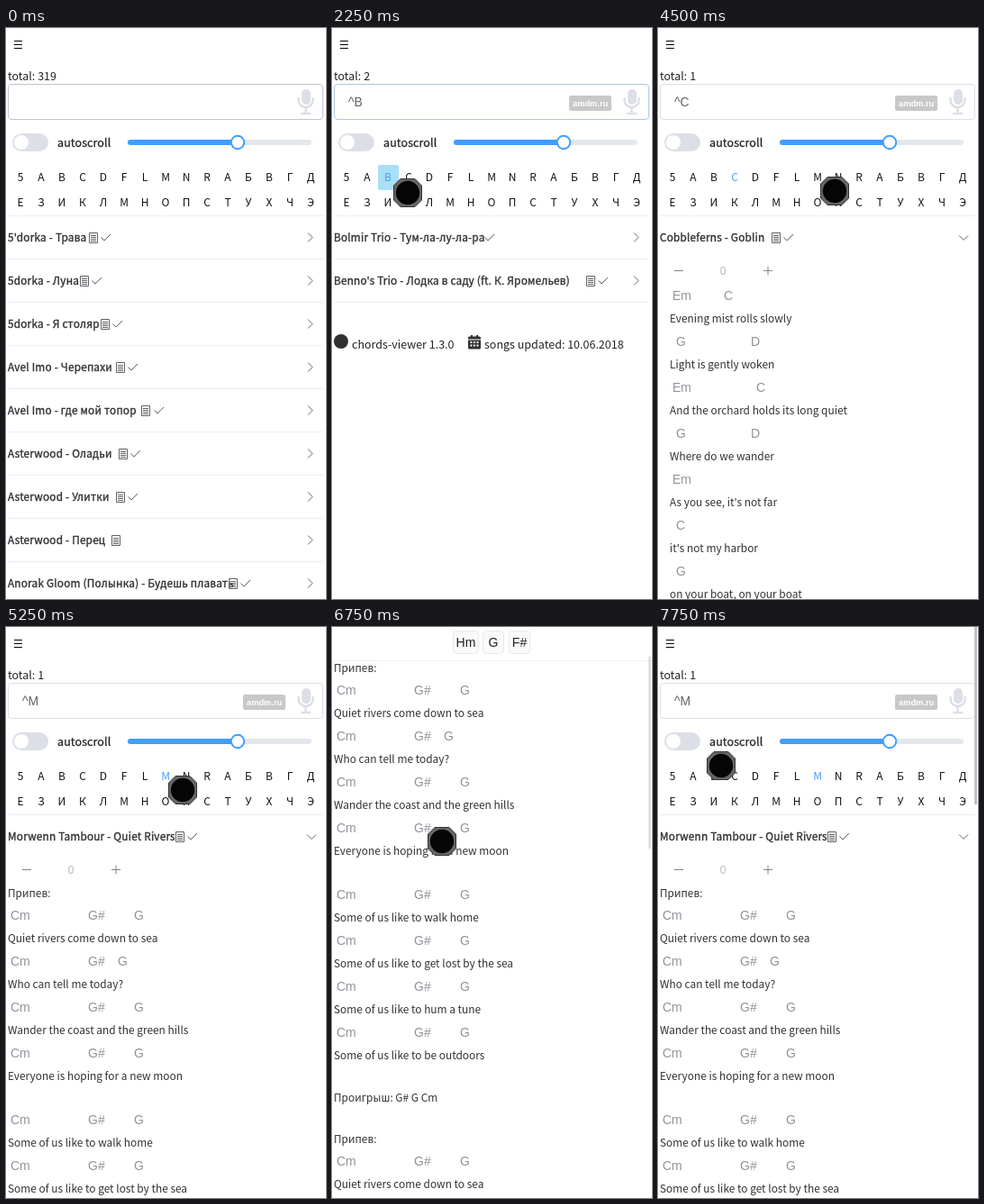
These frames come from a looping animation (355 by 634 pixels, 8000 ms). An HTML page:

```html
<!DOCTYPE html>
<html lang="ru">
<head>
<meta charset="utf-8">
<title>Chords viewer</title>
<style>
html, body { margin: 0; width: 100%; height: 100%; overflow: hidden; background: #fff; }
svg { display: block; width: 355px; height: 634px; fill: none; }
text { font: 12.5px "Noto Sans CJK SC", "Noto Sans CJK JP", "Noto Sans", sans-serif; fill: #222; white-space: pre; }
.title { font-size: 11.8px; letter-spacing: .2px; fill: #303133; stroke: #303133; stroke-width: .35px; }
.label { stroke: #222; stroke-width: .25px; letter-spacing: .1px; }
.lyric { font-size: 11.9px; fill: #303133; }
.key { font-size: 12px; text-anchor: middle; fill: #111; }
.key.on { fill: #409eff; }
.arial, .chord, .pill, .tag, .shift { font: 14px "Liberation Sans", Arial, sans-serif; fill: #606266; }
.chord { fill: #909399; }
.pill { fill: #222; text-anchor: middle; }
.tag { font-size: 9.3px; font-weight: 700; fill: #fff; }
.shift { font-size: 12px; fill: #b4b8c0; text-anchor: middle; }
</style>
</head>
<body>
<svg id="stage" viewBox="0 0 355 634"></svg>
<script>
const KEYS = ['5ABCDFLMNRAБВГД', 'ЕЗИКЛМНОПСТУХЧЭ'];

// [title, x of the text icon, x of the check mark]
const ALL = [
  ["5'dorka - Трава", 92, 105], ['5dorka - Луна', 82, 95], ['5dorka - Я столяр', 105, 118],
  ['Avel Imo - Черепахи', 122, 135], ['Avel Imo - где мой топор', 150, 164],
  ['Asterwood - Оладьи', 125, 138], ['Asterwood - Улитки', 122, 135], ['Asterwood - Перец', 117, 0],
  ['Anorak Gloom (Полынка) - Будешь плавать', 247, 260]
];
const BANDS = [
  ['Bolmir Trio - Тум-ла-лу-ла-ра', 0, 169],
  ["Benno's Trio - Лодка в саду (ft. К. Яромельев)", 282, 295]
];
const GOBLIN = ['Cobbleferns - Goblin', 126, 139];
const RIVERS = ['Morwenn Tambour - Quiet Rivers', 188, 201];

// [y of the chords, chords with their x, line below]
const GOBLIN_TEXT = [
  [297, 'Em16 C73', 'Evening mist rolls slowly'],
  [348, 'G20 D103', 'Light is gently woken'],
  [399, 'Em16 C109', 'And the orchard holds its long quiet'],
  [450, 'G20 D103', 'Where do we wander'],
  [501, 'Em16', "As you see, it's not far"],
  [552, 'C20', "it's not my harbor"],
  [603, 'G20', 'on your boat, on your boat']
];
const CM = 'Cm5 G#91 G142';
const FIRST = 'Quiet rivers come down to sea';
const RIVERS_TEXT = [
  [269.5, '', 'Припев:'],
  [320, CM, FIRST],
  [371, 'Cm5 G#91 G124', 'Who can tell me today?'],
  [422, CM, 'Wander the coast and the green hills'],
  [473, CM, 'Everyone is hoping for a new moon'],
  [547, CM, 'Some of us like to walk home'],
  [598, CM, 'Some of us like to get lost by the sea'],
  [649, CM, 'Some of us like to hum a tune'],
  [700, CM, 'Some of us like to be outdoors'],
  [746.5, '', 'Проигрыш: G# G Cm'],
  [792.5, '', 'Припев:'],
  [843, CM, FIRST]
];

// [start, x, y]
const POINTER = [
  [750, 119, 317], [1000, 84, 183], [1250, 75, 184], [1500, 84, 183], [1750, 85, 182], [2000, 84, 183],
  [3000, 107, 180], [3500, 107, 178], [4000, 136, 180], [4250, 184, 182], [4500, 196, 181],
  [6000, 168, 279], [6250, 168, 298], [6500, 150, 235], [6750, 122, 238], [7000, 103, 265],
  [7500, 82, 240], [7750, 70, 154]
];

// later entries override earlier ones
const STATES = [
  [0, { page: 'all', total: 319, border: '#c0c4cc', query: '', key: -1, scroll: 0 }],
  [2250, { page: 'bands', total: 2, border: '#a9c8e8', query: '^B', key: 2, tap: 2 }],
  [2500, { border: '#dcdfe6', tap: 0 }],
  [3750, { page: 'goblin', total: 1, query: '^C', key: 3 }],
  [5000, { tap: 7 }],
  [5250, { page: 'rivers', query: '^M', key: 7, tap: 0 }],
  [6250, { scroll: 169, chords: true, thumb: [7, 213, 1] }],
  [6500, { scroll: 250, thumb: [33, 213, 1] }],
  [6750, { thumb: [33, 213, .5] }],
  [7000, { thumb: [33, 213, 0] }],
  [7250, { scroll: 195, chords: false, sticky: true, thumb: [16, 213, 1] }],
  [7500, { scroll: 0, sticky: false, thumb: [0, 205, 1] }],
  [7750, { thumb: [0, 197, 1] }]
];

const text = (x, y, s, cls = '') => `<text x="${x}" y="${y}" class="${cls}">${s}</text>`;
const rect = (x, y, w, h, fill, more = '') => `<rect x="${x}" y="${y}" width="${w}" height="${h}" fill="${fill}" ${more}/>`;
const path = (d, color = '#606266', w = 1) => `<path d="${d}" stroke="${color}" stroke-width="${w}"/>`;
const circle = (x, y, r, fill, more = '') => `<circle cx="${x}" cy="${y}" r="${r}" fill="${fill}" ${more}/>`;
const rule = y => path(`M2 ${y}H352`, '#ebeef5');
const down = (x, y) => path(`M${x - 5} ${y - 2.5}l5 5 5-5`);

function song([name, doc, check], y) {
  return text(2, y + 4, name, 'title') +
    (doc ? path(`M${doc + .5} ${y - 5}h9v11h-9zM${doc + 2} ${y - 2}h6m-6 2h6m-6 2h6m-6 2h6`) : '') +
    (check ? path(`M${check + .5} ${y}l3.5 3.5 7-7`) : '');
}

function list(songs) {
  return songs.map((s, i) => {
    const y = 232.5 + 48 * i;
    return song(s, y) + path(`M335 ${y - 5}l5 5-5 5`) + rule(y + 24);
  }).join('');
}

function footer() {
  const x = 151, y = 341;
  let dots = '';
  for (let i = 0; i < 6; i++) dots += rect(x + 2.5 + i % 3 * 3.5, y + 7 + (i > 2) * 3.5, 2, 2, '#fff');
  return circle(10, 348, 8, '#303133') + text(22, 356, 'chords-viewer 1.3.0') +
    rect(x, y + 1.5, 14, 14, '#303133', 'rx="1.5"') + path(`M${x + 4} ${y}v3m6-3v3`, '#303133', 2) +
    path(`M${x} ${y + 5}h14`, '#fff') + dots + text(169, 356, 'songs updated: 10.06.2018');
}

function sheet(name, x, lines, shift) {
  return song(name, 232.5) + down(339 - shift, 233) +
    path('M18 269.5h10M117 269.5h10m-5-5v10', '#808389') + text(72, 274, 0, 'shift') +
    lines.map(([y, chords, line]) =>
      chords.replace(/(\D+)(\d+) ?/g, (_, c, cx) => text(cx, y + 5, c, 'chord')) +
      text(x, y + 30, line, 'lyric')).join('');
}

function header(s) {
  return rect(0, 0, 355, 157, '#fff') +
    path('M9 14.5h9m-9 4h9m-9 4h9', '#000') + text(2, 58, 'total: ' + s.total) +
    rect(2.5, 62.5, 349, 39, '#fff', `rx="3.5" stroke="${s.border}"`) +
    (s.query ? text(18, 87, s.query, 'arial') + rect(263, 75, 47, 17, '#c8c8c8', 'rx="2"') + text(267, 87, 'amdm.ru', 'tag') : '') +
    rect(328, 68, 10, 17, '#dcdfe6', 'rx="5"') +
    path('M324.5 77v3a8 8 0 0 0 16 0v-3M332.5 88v7M327 95h11', '#dcdfe6', 2.4) +
    rect(7, 117, 40, 20, '#dcdfe6', 'rx="10"') + circle(17, 127, 8, '#fff') +
    text(57, 132, 'autoscroll', 'label') +
    rect(135, 124, 204, 6, '#e4e7ed', 'rx="3"') + rect(135, 124, 122, 6, '#409eff', 'rx="3"') +
    circle(257, 127, 7.2, '#fff', 'stroke="#409eff" stroke-width="2"');
}

function keys(s) {
  return (s.tap ? rect(5 + 23 * s.tap, 152, 23, 28, '#a9dff7', 'rx="2"') : '') +
    KEYS.map((row, r) => [...row].map((c, i) =>
      text(16 + 23 * i, 170 + 28 * r, c, 'key' + (!r && i === s.key ? ' on' : ''))).join('')).join('') + rule(208.5);
}

function chordBar() {
  return rect(0, 0, 355, 37, '#fff') + path('M0 37.5H355', '#f0f0f0') +
    [[134, 29, 'Hm'], [167, 24, 'G'], [196, 24, 'F#']].map(([x, w, c]) =>
      rect(x + .5, 4.5, w - 1, 25, '#fafafa', 'rx="4" stroke="#e8e8e8"') + text(x + w / 2, 22, c, 'pill')).join('');
}

function pointer(x, y) {
  return `<g transform="translate(${x} ${y})">` +
    '<path d="M-8-15.5H8L15.5-8V8L8 15.5H-8L-15.5 8V-8Z" fill="#666" stroke="#333"/>' +
    circle(0, 0, 13.2, '#050505') + '</g>';
}

function draw(t) {
  const s = Object.assign({}, ...STATES.filter(e => e[0] <= t).map(e => e[1]));
  const shift = s.scroll ? 11 : 0;
  const pages = {
    all: () => list(ALL),
    bands: () => list(BANDS) + footer(),
    goblin: () => sheet(GOBLIN, 13, GOBLIN_TEXT, shift),
    rivers: () => sheet(RIVERS, 2, RIVERS_TEXT, shift)
  };
  let out = `<g transform="translate(0 ${-s.scroll})">${s.sticky ? '' : header(s)}${keys(s)}${pages[s.page]()}</g>`;
  if (s.sticky) out += `<g transform="translate(0 -60)">${header(s)}${path('M0 157.5H355', '#e4e7ed')}</g>` + down(327, 38);
  if (s.chords) out += chordBar();
  if (s.thumb) out += rect(351, s.thumb[0], 3, s.thumb[1], '#c1c1c1', `opacity="${s.thumb[2]}"`);
  const p = POINTER.filter(e => e[0] <= t).pop();
  if (p) out += pointer(p[1], p[2]);
  stage.innerHTML = out;
}

const stage = document.getElementById('stage');
const start = performance.now();
let last = -1;
function tick() {
  const t = Math.floor((performance.now() - start) % 8000 / 250) * 250;
  if (t !== last) draw(last = t);
  requestAnimationFrame(tick);
}
tick();
</script>
</body>
</html>
```
